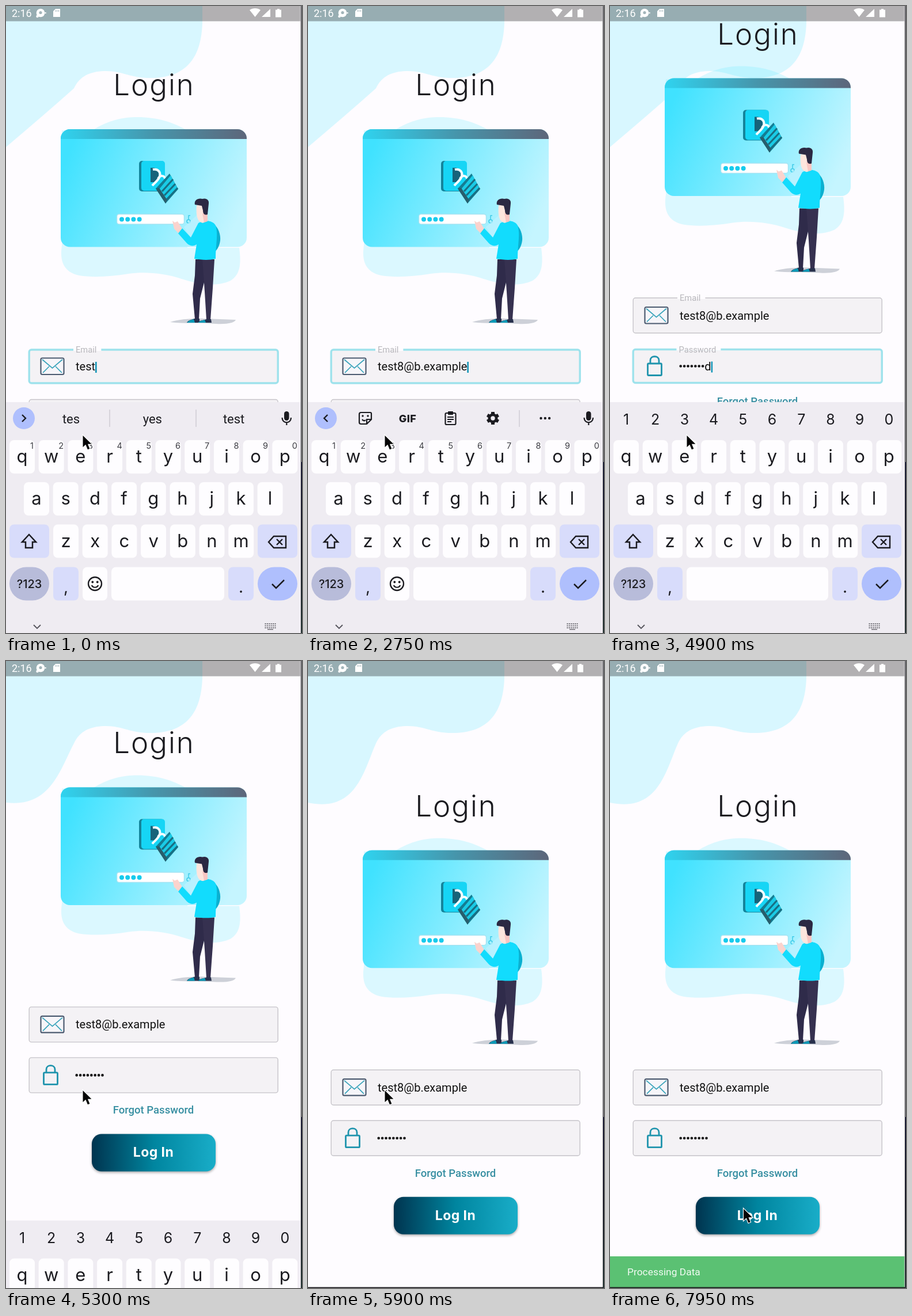
Animation, 514 px wide and 1089 px high, one loop 8000 ms. Source, as an HTML page with a canvas:

```html
<!DOCTYPE html>
<html lang="en">
<head>
<meta charset="utf-8">
<title>Login</title>
<style>
html, body { margin: 0; width: 100%; height: 100%; overflow: hidden; background: #fefcff; }
canvas { display: block; width: 514px; height: 1089px; }
</style>
</head>
<body>
<canvas id="stage" width="514" height="1089"></canvas>
<script>
const ctx = document.getElementById('stage').getContext('2d');
const LOOP = 8000, PAGE = '#fefcff', INK = '#1b1b20', PITCH = 50.7;
const ROBOTO = 'Roboto, Arial, sans-serif', INTER = 'Inter, Arial, sans-serif';
const EMAIL = 'test8@b.example', PASS = 'password';
const MAIL_TIMES = [450, 800, 1150, 1300, 1450, 1600, 1750, 1950, 2100, 2250, 2400];
const PASS_TIMES = [3600, 3750, 3900, 4050, 4250, 4400, 4550, 4700];
const FOCUS = 3000, DONE = 5160, CLICK = 7000;

const clamp = v => Math.max(0, Math.min(1, v));
const smooth = p => p * p * (3 - 2 * p);
const span = (t, from, length) => clamp((t - from) / length);
const mix = (a, b, p) => a + (b - a) * p;

function along(points, t) {
  if (t <= points[0][0]) return points[0][1];
  for (let i = 1; i < points.length; i++) {
    const [t0, v0] = points[i - 1], [t1, v1] = points[i];
    if (t <= t1) return mix(v0, v1, (t - t0) / (t1 - t0));
  }
  return points[points.length - 1][1];
}

function fill(d, color) {
  ctx.fillStyle = color;
  ctx.fill(new Path2D(d));
}
function line(d, color = INK, width = 2.4) {
  ctx.strokeStyle = color;
  ctx.lineWidth = width;
  ctx.stroke(new Path2D(d));
}
function box(x, y, w, h, r, color, edge, width) {
  ctx.beginPath();
  ctx.roundRect(x, y, w, h, r);
  if (color) { ctx.fillStyle = color; ctx.fill(); }
  if (edge) { ctx.strokeStyle = edge; ctx.lineWidth = width; ctx.stroke(); }
}
function dot(x, y, r, color) {
  ctx.fillStyle = color;
  ctx.beginPath();
  ctx.arc(x, y, r, 0, 7);
  ctx.fill();
}
function label(str, x, y, font, color = INK, align = 'left', spacing = 0) {
  ctx.font = font;
  ctx.fillStyle = color;
  ctx.textAlign = align;
  ctx.letterSpacing = spacing + 'px';
  ctx.fillText(str, x, y);
  ctx.letterSpacing = '0px';
}
function ramp(x0, y0, x1, y1, ...colors) {
  const g = ctx.createLinearGradient(x0, y0, x1, y1);
  colors.forEach((c, i) => g.addColorStop(i / (colors.length - 1), c));
  return g;
}

function drawBackdrop(open) {
  const c = [mix(80, 97, open), mix(177, 190, open), mix(40, 84, open), mix(211, 264, open)];
  fill(`M0 0H341V30C339 82 320 123 255 125C215 126 203 112 170 113C145 114 128 122 118 143C${c} 0 ${mix(245, 246, open)}Z`, '#d8f7ff');
}

function drawMan() {
  fill('M285 549C300 544 325 542 345 543L399 545C397 550 385 553 365 552C335 550 310 552 285 549Z', '#cdd0d8');
  fill('M333 362L309 384L322 404L336 380Z', 'rgba(190,242,255,.75)');
  fill('M329 440H350L345 476L337 508L335 544H328L324 500L328 468Z', '#2f2b4a');
  fill('M341 440H362L359 490L355 545H348L345 496Z', '#363150');
  fill('M327 543H336V550H314C316 546 322 545 327 543Z', '#27304c');
  fill('M348 544H356L357 550H333C336 546 343 546 348 544Z', '#27304c');
  fill('M319 546L326 544L328 550H314Z', '#0b9bb8');
  fill('M338 547L345 545L347 550H333Z', '#0b9bb8');
  fill('M359 378C369 383 373 398 372 407C371 416 367 424 361 428Z', '#0bb0d0');
  fill('M289 373L293 376L298 374L306 387L300 395L292 387Z', '#fbd3cd');
  fill('M334 377C344 371 359 372 364 381C369 396 364 414 364 439C352 442 339 441 327 439L331 414C326 418 319 417 314 412L299 395L306 386L321 402Z', '#12dcfd');
  fill('M331 346H346V374C342 379 338 376 335 373C331 368 330 359 331 346Z', '#fde5dd');
  fill('M341 360L350 358V374L344 376Z', '#f8c6c2');
  fill('M328 345C326 337 334 333 341 335C348 333 353 337 352 343L350 362C345 364 342 361 342 355L340 347Z', '#2b2842');
}

function drawScene() {
  label('Login', 257, 155, '300 51px Montserrat, ' + INTER, INK, 'center', 2);
  fill('M150 216C178 198 204 193 228 193C263 193 290 202 315 216V420H405C409 450 406 467 390 477C367 488 336 484 305 474C276 464 241 461 213 465C181 470 151 472 127 468C100 462 93 443 97 416V216Z', 'rgba(79,227,255,.2)');
  box(95, 214, 323, 204.5, 16, ramp(115, 240, 405, 365, '#40e2ff', '#83ecff', '#c5f5ff'));
  box(95, 214, 323, 17, [16, 16, 0, 0], ramp(95, 0, 418, 0, '#2fd3ef', '#4695ab', '#5d667a'));

  box(231, 269, 43, 53, 5, '#14849b');
  box(235, 269, 41, 52, 5, '#16d5f5');
  fill('M251 281H257C268 284 268 302 257 306H251Z', '#17637a');
  line('M255 284C265 282 270 290 266 298C263 304 258 307 254 312M264 300C268 293 275 294 276 300', '#f4fdff', 4);
  fill('M260 317L284 291L299 318L277 343Z', '#147d93');
  fill('M266 318L286 294L298 317L279 337Z', '#1acbe6');
  line('M271 322L290 301M275 329L294 309M279 336L298 316', '#196f83', 3.2);
  fill('M260 317L266 316L280 337L277 343Z', '#285e6c');

  box(192.5, 361.5, 117, 17.5, 4, '#fff', '#a4e3f2', 1.5);
  for (let i = 0; i < 4; i++) dot(201 + i * 10.2, 370.5, 4, '#16cbed');
  line('M317 371V364H320M320 374A3 3 0 1 1 314 374A3 3 0 1 1 320 374', '#41cbe9', 1.5);
  drawMan();
}

function drawField(cy, name, labelX, focused, named) {
  const half = focused ? 29 : 30.5;
  box(40.2, cy - half, 432, half * 2, 4, '#f4f2f5', focused ? '#9ee2ec' : '#c6c4c9', focused ? 3.4 : 1.4);
  if (!named) return;
  ctx.font = '14.7px ' + ROBOTO;
  const w = ctx.measureText(name).width;
  ctx.fillStyle = PAGE;
  ctx.fillRect(labelX - 4, cy - half - 3, w + 12, 5);
  label(name, labelX, cy - half + 5, '14.7px ' + ROBOTO, '#b7b6bb');
}

function drawCaret(x, cy, t, last) {
  if ((t - last) % 1000 >= 500) return;
  ctx.fillStyle = '#1596b8';
  ctx.fillRect(x, cy - 9, 2.6, 19);
}

function drawForm(t) {
  const onMail = t < FOCUS, onPass = !onMail && t < DONE;
  drawField(626, 'Email', 121, onMail, t < DONE);
  drawField(714, 'Password', 119.5, onPass, onPass);

  box(60.5, 611.5, 40, 28.5, 2.5, '#f6f5f9', '#4c5b70', 2.2);
  line('M63 614L80.5 629L98 614M64 637L75 626M97 637L86 626', '#38a3ba', 1.7);
  box(65.5, 709.5, 24, 20.5, 1.5, null, '#1f94ad', 2.8);
  line('M70 709V704C70 695 85 695 85 704V709', '#1f94ad', 2.8);

  const typed = MAIL_TIMES.filter(s => s <= t);
  const mail = EMAIL.slice(0, 4 + typed.length);
  label(mail, 121, 633, '20px ' + ROBOTO, '#111');
  if (onMail) drawCaret(121 + ctx.measureText(mail).width, 627, t, typed.at(-1) || 0);

  const keyed = PASS_TIMES.filter(s => s <= t), n = keyed.length;
  const last = keyed.at(-1) || FOCUS;
  const peek = n > 0 && t - last < 400;
  const dots = peek ? n - 1 : n;
  for (let i = 0; i < dots; i++) dot(122.7 + i * 6.4, 714, 2.3, '#111');
  let end = 119.5 + dots * 6.4;
  if (peek) {
    label(PASS[n - 1], end, 721.5, '20px ' + ROBOTO, '#111');
    end += ctx.measureText(PASS[n - 1]).width;
  }
  if (onPass) drawCaret(end, 715, t, last);

  label('Forgot Password', 256, 781, '500 18.5px ' + ROBOTO, '#388fa2', 'center');
  ctx.save();
  ctx.shadowColor = 'rgba(0,0,0,.35)';
  ctx.shadowBlur = 4;
  ctx.shadowOffsetY = 2;
  box(149, 816, 215, 65, 17, ramp(149, 0, 364, 0, '#00344f', '#00859f', '#19adc8'));
  ctx.restore();
  label('Log In', 256, 856, '700 23px Montserrat, ' + INTER, '#fff', 'center', 0.4);
}

function drawMic() {
  box(483, 704, 8.5, 16, 4.2, INK);
  line('M479.5 715C479.5 726 495 726 495 715M487.3 723V728', INK, 2.2);
}

function drawSuggestions() {
  dot(31, 716, 19, '#afbffd');
  line('M28 710L34 716L28 722');
  ['tes', 'yes', 'test'].forEach((w, i) => label(w, 113 + i * 141.3, 725, '22px ' + ROBOTO, INK, 'center'));
  line('M180 701V731M330 701V731', '#c9c7cf', 1.3);
  drawMic();
}

function drawTools() {
  dot(31, 716, 19, '#afbffd');
  line('M34 710L28 716L34 722');
  line('M108 706H92Q89 706 89 709V723Q89 726 92 726H102L110 718V708Q110 706 108 706M102 726V718H110M94 718Q97 722 100 719', INK, 2.2);
  dot(95, 712, 1.7, INK);
  dot(104, 712, 1.7, INK);
  label('GIF', 173, 722.5, '800 18px ' + INTER, INK, 'center', 0.5);
  box(238.5, 707, 18, 20, 2, null, INK, 2.2);
  box(243, 704, 9, 6, 1, INK);
  line('M242 714H253M242 718H253M242 722H249', INK, 1.8);
  for (let i = 0; i < 6; i++) {
    const a = i * Math.PI / 3 + Math.PI / 6, x = Math.cos(a), y = Math.sin(a);
    line(`M321 716L${321 + x * 11} ${716 + y * 11}`, INK, 6);
  }
  dot(321, 716, 8.5, INK);
  dot(321, 716, 3.7, '#efecf2');
  line('M367 702V731', '#c9c7cf', 1.3);
  for (let i = 0; i < 3; i++) dot(404.5 + i * 7.3, 716, 2.2, INK);
  drawMic();
}

function drawRow(keys, x, y, hints) {
  [...keys].forEach((k, i) => {
    const cx = x + i * PITCH;
    box(cx - 22, y, 44, 58, 8, '#fefdff');
    label(k, cx, y + 39, '31px ' + INTER, INK, 'center');
    if (hints) label((i + 1) % 10, cx + 17, y + 15, '14.5px ' + INTER, '#3b3b42', 'center');
  });
}

function drawKeyboard(t) {
  const secret = t >= FOCUS;
  ctx.fillStyle = '#efecf2';
  ctx.fillRect(0, 688, 511.5, 402);
  if (secret) {
    for (let i = 0; i < 10; i++) label((i + 1) % 10, 28 + i * PITCH, 727, '25px ' + INTER, INK, 'center');
  } else if (t < MAIL_TIMES[0]) drawSuggestions();
  else drawTools();

  drawRow('qwertyuiop', 28, 754, !secret);
  drawRow('asdfghjkl', 53, 827);
  drawRow('zxcvbnm', 104, 900.5);

  box(6, 900.5, 69, 58, 8, '#d8dcfb');
  line('M40 918L52 931H46V941H34V931H28Z', INK, 2.5);
  box(437, 900.5, 69, 58, 8, '#d8dcfb');
  line('M465 921H486V941H465L456 931ZM470 926L480 936M480 926L470 936', INK, 2.4);

  box(6, 974.5, 69, 58, 29, '#b8bcda');
  label('?123', 40.5, 1011, '500 20px ' + INTER, INK, 'center');
  box(82, 974.5, 44, 58, 8, '#d8dcfb');
  label(',', 104, 1019, '28px ' + INTER, INK, 'center');
  const left = secret ? 133 : 183;
  box(left, 974.5, 379 - left, 58, 8, '#fefdff');
  if (!secret) {
    box(133, 974.5, 43, 58, 8, '#fefdff');
    box(143, 992, 23, 23, 11.5, null, INK, 2.3);
    dot(150.3, 1000.5, 1.9, INK);
    dot(158.7, 1000.5, 1.9, INK);
    line('M148.8 1006C151 1011 158 1011 160.2 1006', INK, 2.1);
  }
  box(386, 974.5, 44, 58, 8, '#d8dcfb');
  label('.', 408, 1019, '28px ' + INTER, INK, 'center');
  box(437, 974.5, 69, 58, 29, '#afbffd');
  line('M462 1004L469 1011L483 997', INK, 2.5);

  line('M48 1075L54 1081L60 1075', '#55545c', 1.8);
  ctx.fillStyle = '#6f6e75';
  for (let r = 0; r < 3; r++) for (let c = 0; c < 6; c++) ctx.fillRect(449.5 + c * 3.4, 1072 + r * 3.5, 2, 2);
  ctx.fillRect(454, 1082, 10, 1.5);
}

function drawStatus() {
  ctx.fillStyle = 'rgba(0,0,0,.3)';
  ctx.fillRect(0, 0, 511.5, 26.5);
  label('2:16', 10, 19, '18px ' + ROBOTO, '#fff');
  dot(60, 12, 7.3, '#fff');
  dot(60, 11.5, 2.6, '#a3b5ba');
  dot(54.5, 18, 2.2, '#fff');
  dot(68.5, 12, 1.3, '#fff');
  fill('M86 5H94V19H82V9Z', '#fff');
  line('M86.5 7V10M89 7V10M91.5 7V10', '#a3b5ba', 1);
  fill('M423 7C428 3 437 3 442 7L432.5 19Z', '#fff');
  fill('M459 5V19H444Z', '#fff');
  fill('M468 6.5H471V5H475V6.5H478V19.5H468Z', '#fff');
}

function drawSnack(t) {
  const p = span(t, CLICK + 120, 250);
  if (!p) return;
  ctx.save();
  ctx.translate(0, 54 * Math.pow(1 - p, 3));
  ctx.fillStyle = '#5bc173';
  ctx.fillRect(0, 1034, 511.5, 55);
  ctx.globalAlpha = span(p, .4, .6);
  label('Processing Data', 30, 1067, '17.4px ' + ROBOTO, '#f2fbf3');
  ctx.restore();
}

function drawPointer(t) {
  const p = smooth(span(t, 6050, 430));
  ctx.save();
  ctx.translate(mix(133.5, 232, p), mix(746, 951.5, p));
  ctx.scale(0.88, 0.88);
  const arrow = 'M0 0V23L5.5 18L9.5 27.5L13.5 26L9.6 16.8H17Z';
  line(arrow, '#fff', 2.6);
  fill(arrow, '#050505');
  ctx.restore();
}

function drawEdges(t) {
  ctx.fillStyle = '#e9e8ec';
  ctx.fillRect(511.5, 0, 3, 1089);
  ctx.fillStyle = '#17171a';
  ctx.fillRect(512, 0, 1.3, 1089);
  ctx.fillStyle = ramp(0, 792, 0, 1089, '#1c1f4c', '#15182c', '#2c4a45');
  ctx.fillRect(513, 792, 1, 297);
  if (t > DONE + 220) {
    ctx.fillStyle = '#17171a';
    ctx.fillRect(0, 1087.5, 513, 1.5);
  }
}

function draw(t) {
  const drop = smooth(span(t, DONE, 220));
  const shift = t < DONE
    ? -88.5 * smooth(span(t, FOCUS, 150))
    : along([[DONE, -88.5], [5300, 5], [5450, 68], [5600, 100], [5720, 112], [5850, 114.7]], t);
  ctx.fillStyle = PAGE;
  ctx.fillRect(0, 0, 514, 1089);
  drawBackdrop(1 - (1 - drop) ** 1.5);
  ctx.save();
  ctx.translate(0, shift);
  drawScene();
  drawForm(t);
  ctx.restore();
  if (drop < 1) {
    ctx.save();
    ctx.translate(0, 402 * drop);
    drawKeyboard(t);
    ctx.restore();
  }
  drawStatus();
  drawSnack(t);
  drawEdges(t);
  drawPointer(t);
}

const start = performance.now();
function tick() {
  draw((performance.now() - start) % LOOP);
  requestAnimationFrame(tick);
}
tick();
</script>
</body>
</html>
```
